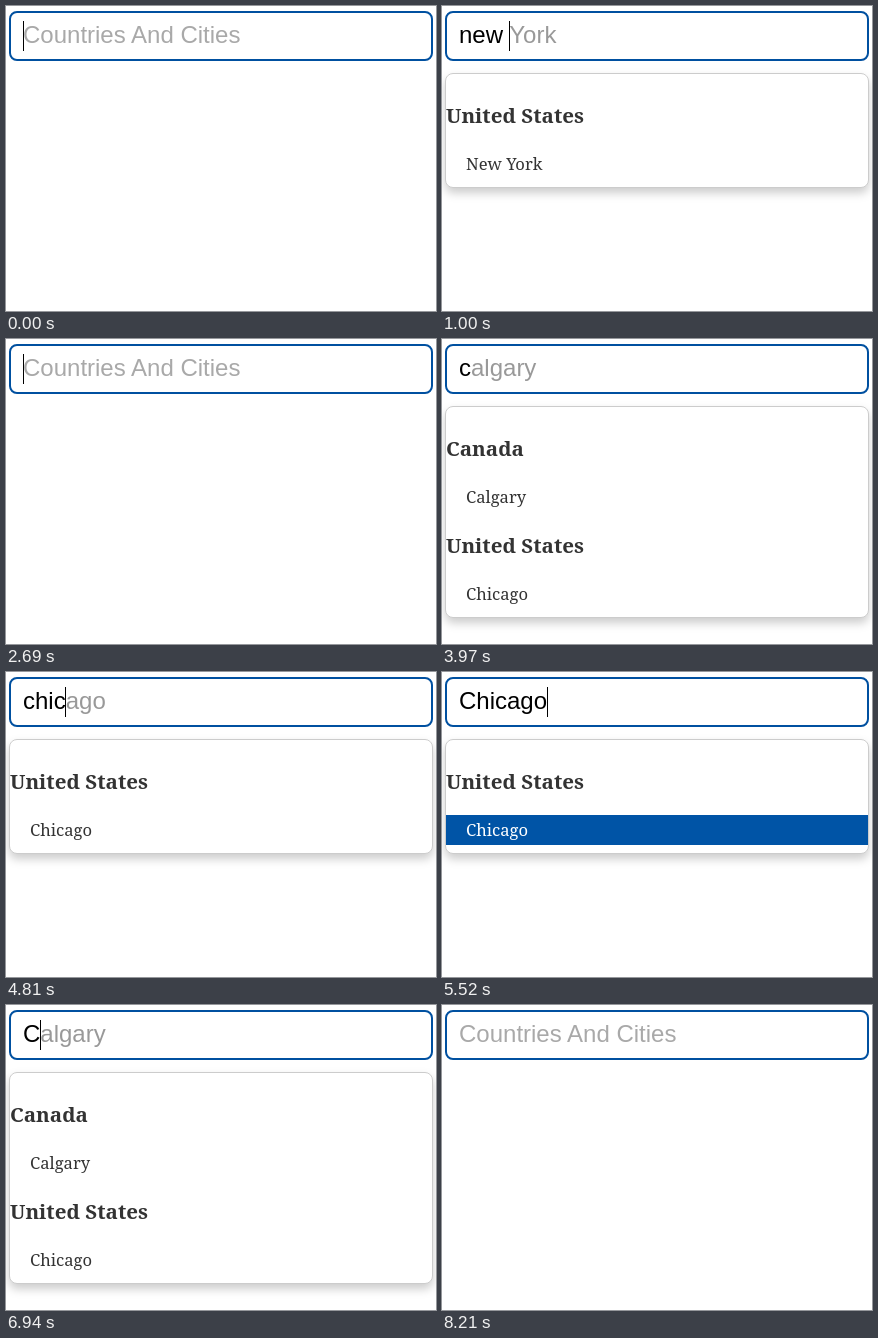
These frames come from a looping animation (430x305 px, 8280 ms). An HTML page:

```html
<!DOCTYPE html>
<html lang="en">
<head>
<meta charset="utf-8">
<title>Typeahead</title>
<style>
  html, body { margin: 0; width: 100%; height: 100%; overflow: hidden; background: #fff; }
  svg { display: block; }
  text { white-space: pre; }
  .field { font: 24px Arial, "Liberation Sans", sans-serif; }
  .hint { fill: #999; }
  .placeholder { fill: #a9a9a9; }
  .menu { fill: #fff; stroke: #ccc; filter: drop-shadow(0 5px 5px rgba(0, 0, 0, .2)); }
  .country { font: bold 20.6px "Noto Serif", serif; fill: #333; }
  .city { font: 16.6px "Noto Serif", serif; fill: #333; }
  .row { fill: none; }
  .selected .row { fill: #0054a6; }
  .selected .city { fill: #fff; }
</style>
</head>
<body>
<svg width="430" height="305" viewBox="0 0 430 305">
  <rect x="4" y="6" width="422" height="48" rx="7" fill="#fff" stroke="#0050a0" stroke-width="2"/>
  <text class="field" x="17" y="37"><tspan id="typed"></tspan><tspan id="rest"></tspan></text>
  <rect id="caret" y="15" width="1" height="30"/>
  <g id="dropdown"></g>
</svg>
<script>
const LOOP = 8280, TICK = 141.5, GROUP_HEIGHT = 97;
const places = [["Canada", "Calgary"], ["United States", "New York"], ["United States", "Chicago"]];

// [tick, field text, caret hidden]
const steps = [[0, ""]];
const add = (tick, text, hidden = false) => steps.push([tick, text, hidden]);
const erase = (tick, word, count) => {
  for (let i = 1; i <= count; i++) add(tick + i - 1, word.slice(0, word.length - i));
};

add(3, "n"); add(4, "ne"); add(5, "new"); add(7, "new "); add(8, "new y");
add(10, "New York");
erase(12, "New York", 8);
add(24, "c"); add(28, "c", true); add(30, "c");
for (let i = 0; i < 5; i++) add(32 + i, "chicago".slice(0, i + 2));
add(38, "Chicago");
erase(40, "Chicago", 4);
add(45, "Ch"); add(46, "C"); add(50, "C", true);
add(52, ""); add(56, "", true);

const [typed, rest, caret, dropdown] =
  ["typed", "rest", "caret", "dropdown"].map(id => document.getElementById(id));

function group([country, city], index, text) {
  return `<g transform="translate(0 ${index * GROUP_HEIGHT})" class="${city === text ? "selected" : ""}">
    <text class="country" x="4" y="117">${country}</text>
    <rect class="row" x="4" y="143" width="422" height="30"/>
    <text class="city" x="24" y="164">${city}</text></g>`;
}

function show([, text, hidden]) {
  const matches = text
    ? places.filter(([, city]) => city.toLowerCase().startsWith(text.toLowerCase()))
    : [];
  typed.textContent = text;
  rest.textContent = text ? matches[0][1].slice(text.length) : "Countries And Cities";
  rest.setAttribute("class", text ? "hint" : "placeholder");
  caret.setAttribute("x", Math.floor(17 + (text ? typed.getComputedTextLength() : 0)));
  caret.setAttribute("visibility", hidden ? "hidden" : "visible");
  dropdown.innerHTML = matches.length
    ? `<rect class="menu" x="3.5" y="67.5" width="423" height="${17 + matches.length * GROUP_HEIGHT}" rx="7.5"/>`
      + matches.map((place, i) => group(place, i, text)).join("")
    : "";
}

let current;
function draw() {
  const tick = (performance.now() % LOOP) / TICK;
  const step = steps.findLast(([start]) => start <= tick);
  if (step !== current) show(current = step);
  requestAnimationFrame(draw);
}
draw();
</script>
</body>
</html>
```
